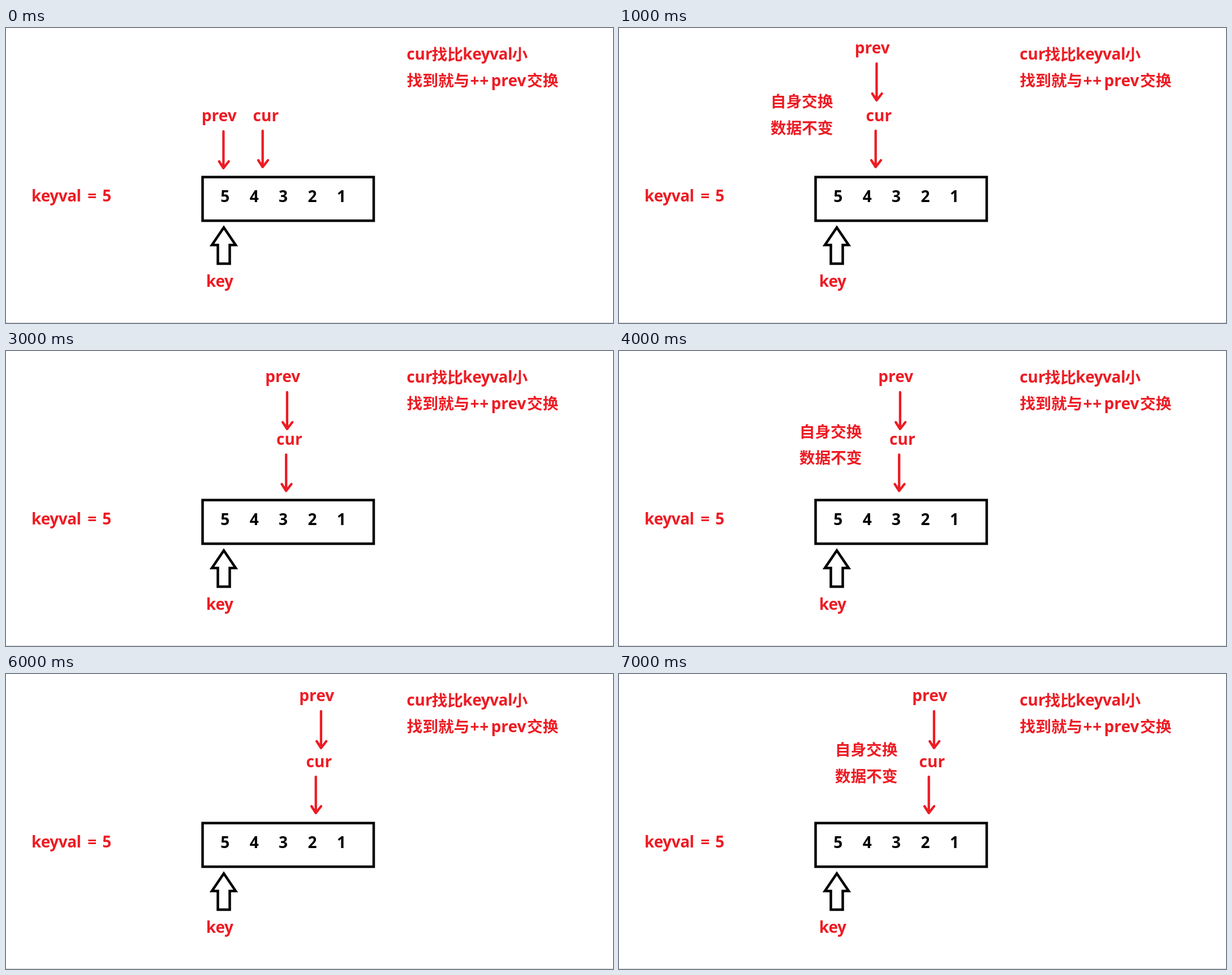
Recreate the animation shown at these times as an HTML page. Size 1073 px wide and 522 px high, loop 8 s.

```html
<!DOCTYPE html>
<html lang="zh-CN">
<head>
<meta charset="utf-8">
<title>Partition pointers</title>
<style>
  html, body { margin: 0; width: 100%; height: 100%; overflow: hidden; background: #fff; }
  svg { display: block; }
  text { font: bold 28px "Noto Sans", "Noto Sans CJK SC", "Noto Sans CJK", sans-serif; fill: #ed1c24; }
  .zh { font: bold 27.7px "Noto Sans CJK SC", "Noto Sans CJK", sans-serif; }
  .tight { letter-spacing: -.5px; }
  .digit { fill: #000; text-anchor: middle; }
  .box { fill: none; stroke: #000; stroke-width: 4.5; }
  .arrow { fill: none; stroke: #ed1c24; stroke-width: 4.3; stroke-linecap: round; stroke-linejoin: round; }
</style>
</head>
<body>
<svg width="1073" height="522" viewBox="0 0 1073 522">
  <text x="708.2" y="56">cur</text>
  <text class="zh" x="752.5" y="56.5">找比</text>
  <text class="tight" x="807.3" y="56">keyval</text>
  <text class="zh" x="894.5" y="56.5">小</text>
  <text class="zh" x="708.5" y="103">找到就与</text>
  <text x="820.5 837.3" y="102.5">++</text>
  <text x="857.6" y="102.5">prev</text>
  <text class="zh" x="921" y="103">交换</text>

  <text class="tight" x="45" y="307">keyval</text>
  <text x="144.3" y="307">=</text>
  <text x="170.3" y="307">5</text>

  <rect class="box" x="347.5" y="263.8" width="302.5" height="77.2"/>
  <g id="digits"></g>
  <path class="box" d="M385 353L406 384H395.5V417H374.5V384H364Z"/>
  <text class="tight" x="353.7" y="458">key</text>
  <path d="M0 521.5H1073" stroke="#d0d0d0"/>

  <g id="prev">
    <text x="-1.2">prev</text>
    <path class="arrow" d="M37.4 18.5V82M29.7 71.5L37.4 83.5L46.7 71.5"/>
  </g>
  <g id="cur">
    <text x="-.4">cur</text>
    <path class="arrow" d="M16.7 17.5V81M9 69.5L16.7 81.5L26 69.5"/>
  </g>
  <g id="note">
    <text class="zh">自身交换</text>
    <text class="zh" y="46.5">数据不变</text>
  </g>
</svg>
<script>
  const $ = id => document.getElementById(id);
  $("digits").innerHTML = [5, 4, 3, 2, 1].map((d, i) =>
    `<text class="digit" x="${387.3 + i * 51.4}" y="307.5">${d}</text>`).join("");

  // One step per second: left edge and baseline of each moving part
  const steps = [
    { prev: [347, 164.5], cur: [437, 164.5] },
    { prev: [418, 44.5], cur: [437, 164.5], note: [267.7, 140] },
    { prev: [403, 164.5], cur: [478.5, 166] },
    { prev: [459.5, 54.5], cur: [478.5, 166] },
    { prev: [459.5, 54.5], cur: [478.5, 166], note: [318.7, 152.5] },
    { prev: [452.5, 160.5], cur: [531, 164.5] },
    { prev: [519.5, 47.5], cur: [531, 164.5] },
    { prev: [519.5, 47.5], cur: [531, 164.5], note: [381.7, 144.3] }
  ];

  function place(id, pos) {
    const part = $(id);
    part.style.display = pos ? "" : "none";
    if (pos) part.setAttribute("transform", `translate(${pos})`);
  }

  function draw() {
    const step = steps[Math.floor(performance.now() / 1000) % steps.length];
    for (const id of ["prev", "cur", "note"]) place(id, step[id]);
    requestAnimationFrame(draw);
  }
  draw();
</script>
</body>
</html>
```
